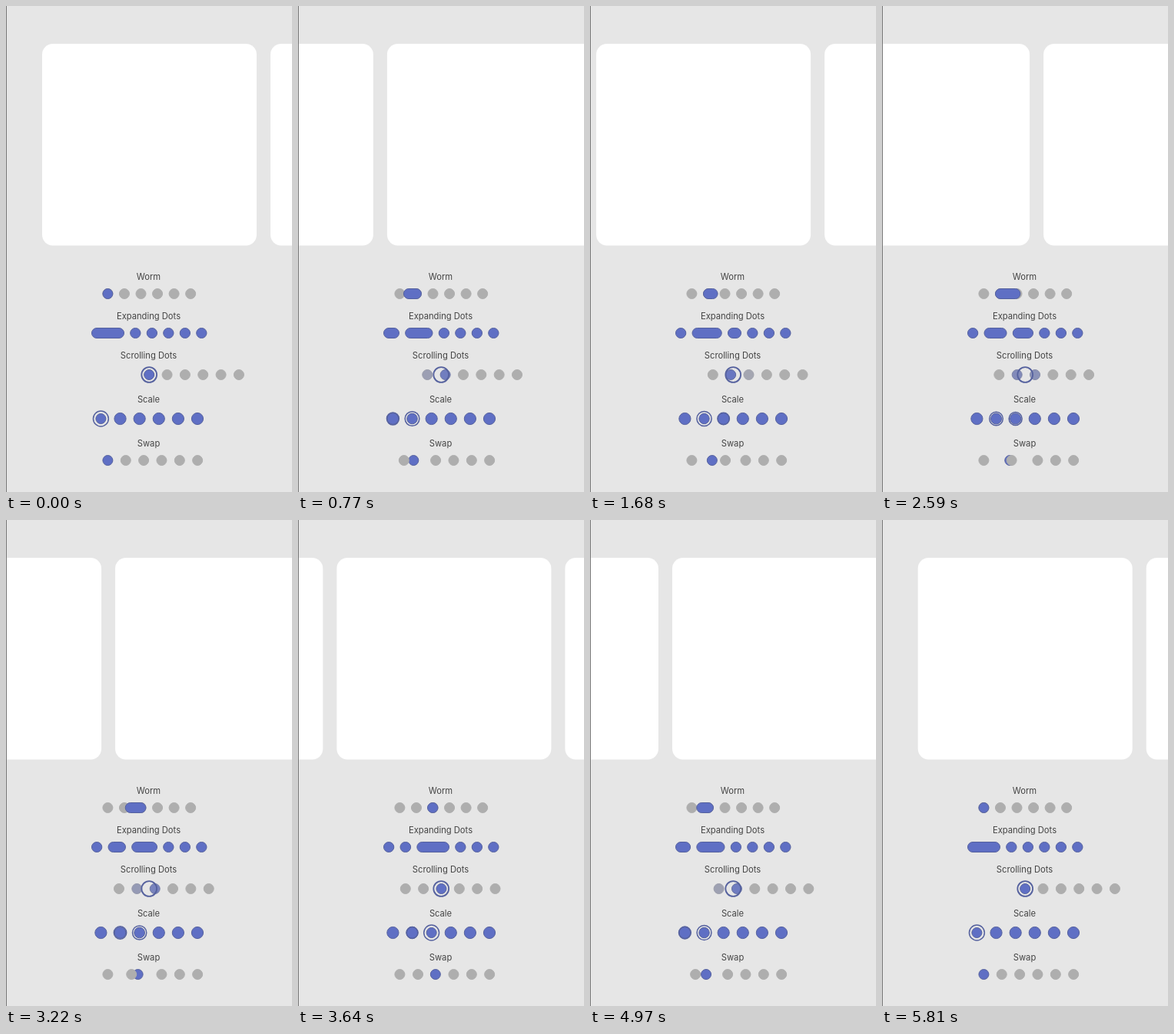
These frames come from a looping animation (372x630 px, 5880 ms). An HTML page:

```html
<!DOCTYPE html>
<html lang="en">
<head>
<meta charset="utf-8">
<title>Page indicators</title>
<style>
  html, body { margin: 0; width: 100%; height: 100%; overflow: hidden; background: #e6e6e6; }
  svg { display: block; width: 372px; height: 630px; }
  text { font: 400 11.2px Inter, Roboto, sans-serif; fill: #444; text-anchor: middle; }
</style>
</head>
<body>
<svg viewBox="0 0 372 630">
  <rect width="372" height="630" fill="#e6e6e6"/>
  <g id="cards"></g>
  <rect width="1" height="630" fill="#777"/>
  <g id="labels"></g>
  <g id="dots"></g>
</svg>
<script>
const LOOP = 5880, STEP = 70, COUNT = 6;
const BLUE = [95, 111, 196], EDGE = [85, 97, 158], GRAY = [174, 174, 174];
const pages = [...Array(COUNT).keys()];
const byId = id => document.getElementById(id);

const clamp = v => Math.max(0, Math.min(1, v));
const mix = (a, b, k) => a + (b - a) * k;
const tint = (a, b, k) => `rgb(${a.map((v, i) => Math.round(mix(v, b[i], k)))})`;
const activity = (i, page) => clamp(1 - Math.abs(i - page));

// Finger drags: [time, page]; a third value is the page to settle on after release.
const track = [
  [0, 0], [420, 0], [490, .02], [560, .13], [630, .36], [700, .6], [770, .768, 1],
  [1300, .996], [1400, 1.02], [1680, 1.131], [2000, 1.29], [2310, 1.425], [2590, 1.451],
  [2940, 1.64], [3080, 1.67], [3220, 1.68, 2],
  [4060, 2], [4130, 1.943], [4200, 1.7, 1],
  [4970, .798, 0], [LOOP, 0]
];
const SETTLE = 126;

function pageAt(t) {
  const k = track.findIndex((key, i) => i > 0 && t < key[0]);
  const [t0, p0, rest] = track[k - 1], [t1, p1] = track[k];
  if (rest !== undefined) return rest + (p0 - rest) * Math.exp((t0 - t) / SETTLE);
  return mix(p0, p1, (t - t0) / (t1 - t0));
}

// Pill from left to right edge, with a thin inner border.
function pill(left, right, y, r, k = 1) {
  return `<rect x="${left + .5}" y="${y - r + .5}" width="${right - left - 1}" height="${2 * r - 1}"
    rx="${r - .5}" fill="${tint(GRAY, BLUE, k)}" stroke="${tint(GRAY, EDGE, k)}"/>`;
}
const dot = (x, y, r, k = 1) => pill(x - r, x + r, y, r, k);
const ring = (x, y, r, width) =>
  `<circle cx="${x}" cy="${y}" r="${r - width / 2}" fill="none" stroke="${tint(EDGE, EDGE, 0)}" stroke-width="${width}"/>`;

function worm(page) {
  const y = 373, r = 7, pitch = 21.55, x = i => 132.4 + pitch * i;
  const base = Math.floor(page), f = page - base;
  const tail = x(base + clamp(2 * f - 1)), head = x(base + clamp(2 * f));
  return pages.map(i => dot(x(i), y, r, 0)).join('') + pill(tail - r, head + r, y, r);
}

function expanding(page) {
  let left = 111;
  return pages.map(i => {
    const right = left + mix(14.3, 43, activity(i, page));
    const shape = pill(left, right, 424, 7);
    left = right + 7.2;
    return shape;
  }).join('');
}

function scrolling(page) {
  const x = 186.2, y = 478;
  return pages.map(i => dot(x + 23.35 * (i - page), y, 7, activity(i, page))).join('')
    + ring(x, y, 10.8, 1.8);
}

function scale(page) {
  return pages.map(i => {
    const x = 123.4 + 25.12 * i, y = 535, k = activity(i, page);
    const core = dot(x, y, mix(8.1, 7, k));
    return k > .002 ? core + ring(x, y, mix(8.1, 10.7, k), 1.5) : core;
  }).join('');
}

function swap(page) {
  const y = 589, pitch = 23.35, x = i => 132.4 + pitch * i;
  const base = Math.floor(page), f = page - base;
  const rest = pages.filter(i => i !== base).map(i => dot(x(i === base + 1 ? i - f : i), y, 7, 0));
  return dot(x(page), y, 7) + rest.join('');
}

const cards = page => pages.map(i =>
  `<rect x="${47 + 297 * (i - page)}" y="49" width="279" height="261.5" rx="14" fill="#fff"/>`).join('');

byId('labels').innerHTML = [
  ['Worm', 355], ['Expanding Dots', 406], ['Scrolling Dots', 457], ['Scale', 514], ['Swap', 571]
].map(([name, y]) => `<text x="185.5" y="${y}">${name}</text>`).join('');

const indicators = [worm, expanding, scrolling, scale, swap];
let shown = -1;

function render(t) {
  const page = pageAt(t);
  byId('cards').innerHTML = cards(page);
  byId('dots').innerHTML = indicators.map(draw => draw(page)).join('');
}

const start = performance.now();
function tick() {
  const t = Math.floor((performance.now() - start) % LOOP / STEP) * STEP;
  if (t !== shown) render(shown = t);
  requestAnimationFrame(tick);
}
tick();
</script>
</body>
</html>
```
